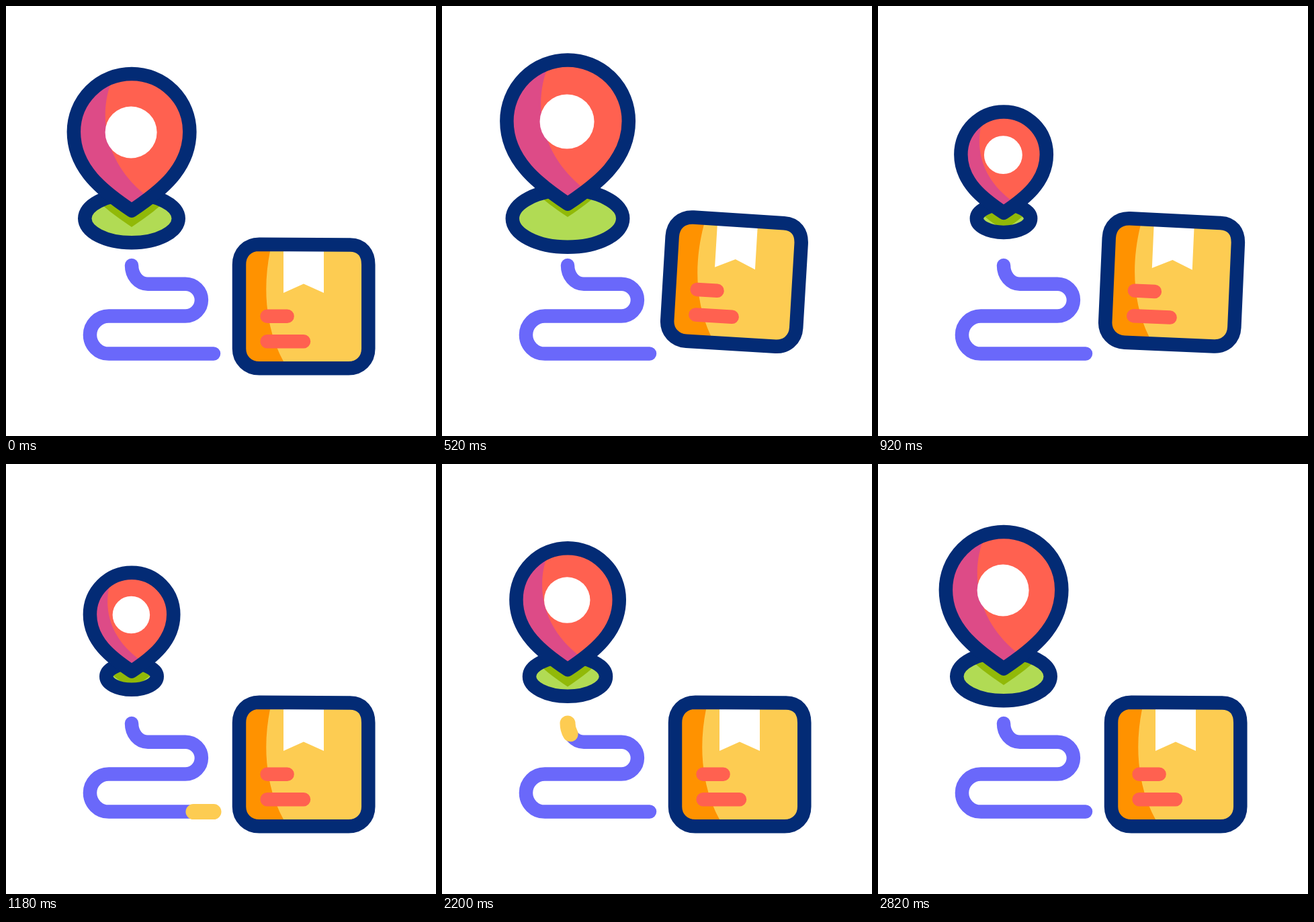
An HTML page for the animation above (2940 ms loop, 640x640 px).

```html
<!DOCTYPE html>
<html lang="en">
<head>
<meta charset="utf-8">
<title>Parcel delivery</title>
<style>
  html, body { margin: 0; width: 100%; height: 100%; overflow: hidden; background: #fff; }
  svg { display: block; width: 100%; height: 100%; }
  .line { fill: none; stroke-width: 20.5; stroke-linecap: round; stroke-linejoin: round; }
  .navy { stroke: #032b75; }
  .yellow { stroke: #fdcc52; }
  .red { stroke: #ff6150; }
</style>
</head>
<body>
<svg viewBox="0 0 640 640">
  <defs>
    <clipPath id="padClip"><ellipse id="padHole" cx="187" cy="316.3"/></clipPath>
    <clipPath id="pinClip"><path id="pinHole"/></clipPath>
    <clipPath id="boxClip"><path d="M377 354.7L512 355.5Q539.3 355.5 539.3 385V510Q539.3 539.3 510 539.3H377Q347 539.3 347 510V385Q347 354.7 377 354.7Z"/></clipPath>
  </defs>

  <path id="road" class="line" stroke="#6a68fa" d="M309 517.6H153A28 28 0 0 1 153 461.5H267A23.9 23.9 0 0 0 267 413.7H211C197 413.7 187 401 187 386"/>
  <path id="trip" class="line yellow" style="stroke-width:23"/>

  <g id="box">
    <g clip-path="url(#boxClip)">
      <path fill="#fdcc52" d="M340 350H545V545H340Z"/>
      <path fill="#ff9200" d="M340 350H396L393 365C382 420 386 480 413 529L420 545H340Z"/>
      <path fill="#fff" d="M413 360H473V427L443 413.5L413 427Z"/>
    </g>
    <path class="line red" d="M388.6 461.7H418.6M388.6 499.3H443"/>
    <path class="line navy" d="M377 354.7L512 355.5C530 355.5 539.3 368 539.3 385V510C539.3 527 527 539.3 510 539.3H377C360 539.3 347 527 347 510V385C347 367 359 354.7 377 354.7Z"/>
  </g>

  <g id="rays"></g>

  <g clip-path="url(#padClip)">
    <path fill="#b1db54" d="M80 250H300V380H80Z"/>
    <path id="shade" fill="#91b908"/>
  </g>
  <ellipse id="pad" class="line navy" cx="187" cy="316.3"/>

  <g id="pin">
    <g clip-path="url(#pinClip)">
      <path fill="#ff6150" d="M-110 -240H110V10H-110Z"/>
      <path id="side" fill="#dd4b87"/>
    </g>
    <circle id="dot" fill="#fff"/>
    <path id="rim" class="line navy"/>
  </g>
</svg>
<script>
const LOOP = 2940;
const $ = id => document.getElementById(id);
const set = (el, attrs) => { for (const k in attrs) el.setAttribute(k, attrs[k]); };
const mix = (a, b, k) => a + (b - a) * k;
const part = (t, a, b) => Math.min(1, Math.max(0, (t - a) / (b - a)));
const smooth = u => (1 - Math.cos(Math.PI * u)) / 2;
const outQuad = u => 1 - (1 - u) * (1 - u);

// Eased value through [time, value] keys
function track(keys, t) {
  let v = keys[0][1];
  for (let i = 1; i < keys.length; i++) {
    const [a] = keys[i - 1], [b, next] = keys[i];
    if (t > a) v = mix(keys[i - 1][1], next, smooth(part(t, a, b)));
  }
  return v;
}

const beats = (a, b, c, d) => [[220, a], [530, b], [990, c], [2020, c], [2340, d]];
const pinSize = beats(1, 1.052, .721, 1);
const pinTip = beats(304.5, 294.5, 308.5, 304.5);
const padSize = beats(1, 1.179, .541, 1);
const pinTilt = [[2340, 0], [2410, 2], [2510, -2], [2620, 1.5], [2720, -1], [2820, 0]];
const boxLift = [[220, 0], [480, -36.2], [900, -36.2], [1140, 0]];
const boxTilt = [[220, 0], [360, -3.4], [520, 3.4], [700, -3.4], [900, 2.6], [1100, 0]];

// Teardrop with its tip at the origin
function drop(s) {
  const p = (x, y) => `${x * s} ${y * s}`, r = 86.25 * s;
  return `M0 0C${p(-42, -28)} ${p(-86.25, -62)} ${p(-86.25, -117.2)}` +
    `A${r} ${r} 0 0 1 ${p(86.25, -117.2)}C${p(86.25, -62)} ${p(42, -28)} 0 0Z`;
}

// Inner end, outer end
const rays = [
  [85, 238, 66, 225], [84, 283, 51, 286], [90, 326.5, 71, 343],
  [286, 241, 306, 226], [287, 284.5, 320.5, 285.5], [282, 329, 298, 344]
].map(([x, y, u, v]) => {
  const el = document.createElementNS('http://www.w3.org/2000/svg', 'path');
  el.setAttribute('class', 'line yellow');
  $('rays').append(el);
  const dx = u - x, dy = v - y;
  return { el, x: x - dx * .59, y: y - dy * .59, dx: dx * 1.71, dy: dy * 1.71 };
});

$('trip').setAttribute('d', $('road').getAttribute('d'));
const roadLen = $('road').getTotalLength();

function drawPin(t) {
  const s = track(pinSize, t), tip = track(pinTip, t), e = track(padSize, t);
  const shape = drop(s), shift = 28 * (s - 1);
  const p = (x, y, k = 1) => `${x * s + shift * k} ${y * s}`;
  set($('pin'), { transform: `translate(187.1 ${tip}) rotate(${track(pinTilt, t)})` });
  set($('rim'), { d: shape });
  set($('pinHole'), { d: shape });
  set($('side'), { d: `M-110 -240L${p(-22, -215)}L${p(-29, -195)}C${p(-48, -150)} ${p(-46, -75)} ${p(22, -22, .25)}L40 10H-110Z` });
  set($('dot'), { cx: -s, cy: -116.5 * s, r: 38.5 * s });

  const size = { rx: 69.75 * e, ry: 36 * e };
  set($('pad'), size);
  set($('padHole'), size);
  set($('shade'), { d: shape, transform: `translate(187 ${329 + 1.5 * (tip - 304.5)})` });
}

function drawTrip(t) {
  const head = smooth(part(t, 1080, 1740)), tail = smooth(part(t, 1670, 2270));
  const len = (head - tail) * roadLen;
  set($('trip'), {
    'stroke-dasharray': `${len} ${roadLen * 3}`,
    'stroke-dashoffset': -tail * roadLen,
    visibility: len > .1 ? 'visible' : 'hidden'
  });
}

function drawRays(t) {
  const head = outQuad(part(t, 2260, 2500)), tail = smooth(part(t, 2320, 2620));
  set($('rays'), { visibility: head - tail > .005 ? 'visible' : 'hidden' });
  for (const r of rays) {
    const at = k => `${r.x + r.dx * k} ${r.y + r.dy * k}`;
    set(r.el, { d: `M${at(tail)}L${at(head)}` });
  }
}

function draw(t) {
  set($('box'), { transform: `translate(0 ${track(boxLift, t)}) rotate(${track(boxTilt, t)} 443 309)` });
  drawPin(t);
  drawTrip(t);
  drawRays(t);
}

const start = performance.now();
function tick(now) {
  draw(Math.max(0, now - start) % LOOP);
  requestAnimationFrame(tick);
}
draw(0);
requestAnimationFrame(tick);
</script>
</body>
</html>
```
